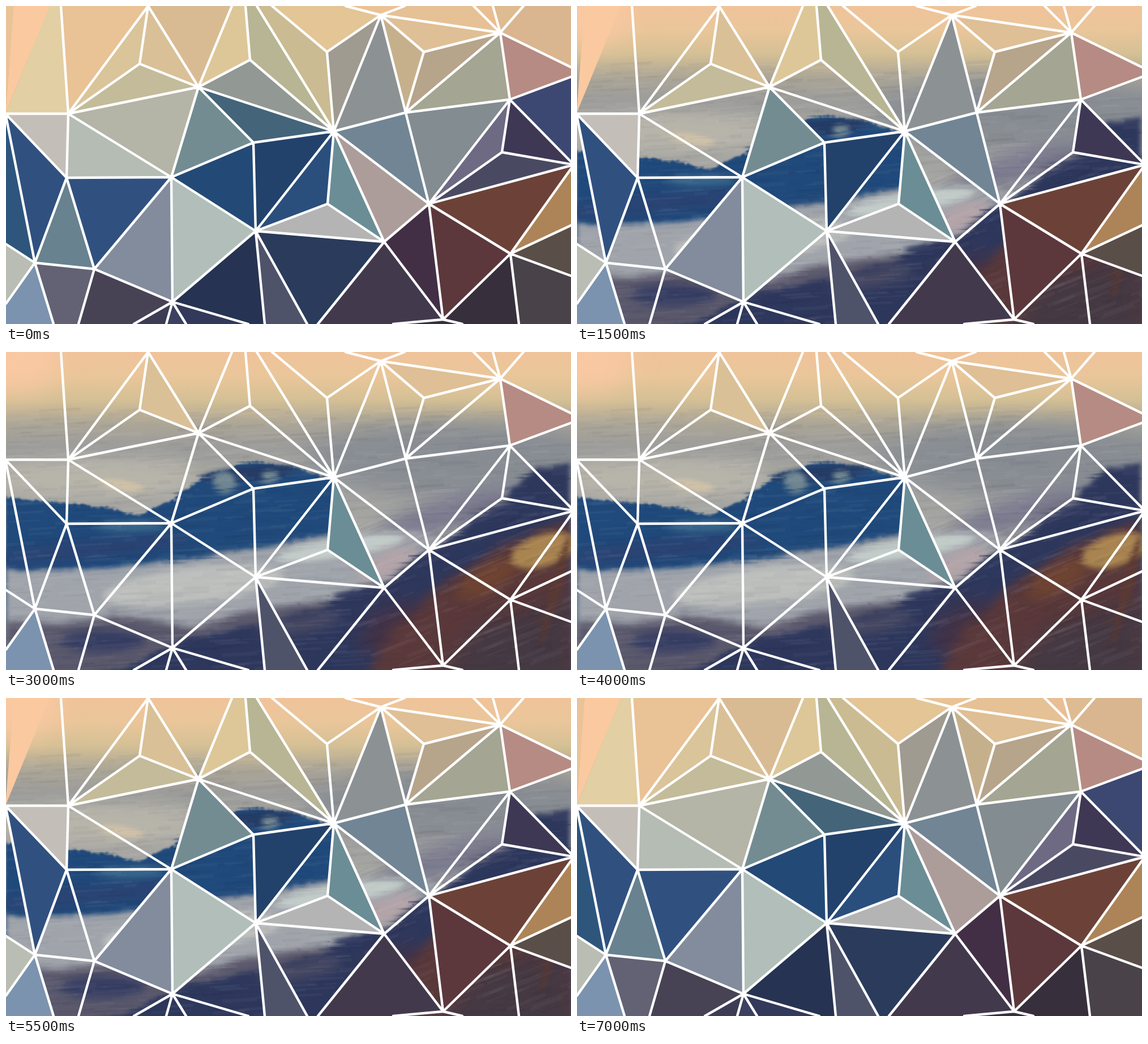
An HTML page with a canvas that plays this animation: 998x561 px, repeating every 7500 ms.

```html
<!DOCTYPE html>
<html lang="en">
<head>
<meta charset="utf-8">
<title>Triangles over a painted landscape</title>
<style>
html, body { margin: 0; width: 100%; height: 100%; overflow: hidden; background: #fff; }
canvas { display: block; }
</style>
</head>
<body>
<canvas id="stage" width="998" height="561"></canvas>
<script>
const W = 998, H = 561, STEP = 500, STEPS = 15;
const ctx = document.getElementById('stage').getContext('2d');

const parse = text => text.trim().split(/\s+/).map(p => p.split(',').map(Number));

// Mesh corners: a-z in the picture, the others on its four sides.
const points = {};
const place = (names, list) => [...names].forEach((n, i) => points[n] = list[i]);
place('abcdefghijklmnopqrstuvwxyz', parse(`
  -1,190 110,190 236,102 340,143 431,95 579,221 567,81 662,16 738,81 873,47 706,188
  890,165 876,258 1003,280 747,349 668,416 568,349 441,397 437,241 292,302 107,303
  51,453 156,464 294,522 891,437 772,553`));
place('8BCDAEFGHIJKLMN',
  [0, 14, 77, 97, 251, 399, 423, 443, 470, 600, 704, 826, 860, 914, W].map(x => [x, 0]));
place('94321' + '0ZYXWVUTS',
  [0, 84, 128, 226, 283, 318, 428, 457, 532, 551, 684, 806, 906, W].map(x => [x, H]));
place('765', [190, 420, 525].map(y => [0, y]));
place('OPQR', [108, 125, 387, 476].map(y => [W, y]));

// Facets by the step at which they disappear, as corners:colour.
const groups = [
  `8Ba7:eac398 bAc:dac49a GHgf:cabb92 jLM:debb91 hik:c6b08c lmo:6e6a83 rqf:2b4f7d
   bdt:b4b4a7 uvw:68828f 7av6:2e567d x21:3c3d54 x0Z:33395a zyTU:37303c trs:234a76`,
  `aCDb:e2cfa4 AdE:d9bb93 ghf:9f9b90 hIJ:e9c295 hJKj:e5c195 mno:494a62 sdf:44647a
   utw:305180 wx23:474354 x10:3c4162 rXWp:2b3b5c poz:422f45 yRST:494248 zVU:37303c`,
  `bDA:e9c296 HIhg:e3c596 jKL:eabe93 jMNO:d9b68f lPn:3d4872 klo:838c90 fop:ac9d9b
   def:929894 but:b5bcb4 vw34:636274 xrYZ:263352`,
  `eFGf:b8b594 ijk:b6a48b fko:718594 auv:305180 ozy:5c383d nyQ:ad8458 txw:838c9d`,
  `aBC:fac9a0 lmn:3e3854 qpr:b4b4b4 dst:738c92 pWVz:423a4c ony:6c4238`,
  `dEFe:ddc799 kjl:a4a592 hfk:8c9294 rsf:22426b bcd:c3bb99 abu:c3beb8 6v5:b9bdb3
   yQR:5a4e48 txr:b1beba`,
  `Acd:d9c097 hji:dfbf95 jOPl:b68b83 fpq:6b8d95 v495:7b93ae rYX:4f536a`
];

const onBorder = ([x, y]) => x <= 0 || y <= 0 || x >= W || y >= H;
const mesh = new Path2D();
const facets = groups.flatMap((group, i) => group.split(/\s+/).map(item => {
  const [names, color] = item.split(':');
  const corners = [...names].map(n => points[n]);
  const path = new Path2D();
  corners.forEach((p, k) => {
    const next = corners[(k + 1) % corners.length];
    path.lineTo(...p);
    if (onBorder(p) && onBorder(next)) return;
    mesh.moveTo(...p);
    mesh.lineTo(...next);
  });
  return { path, color: '#' + color, gone: i + 1 };
}));

let seed = 7;
const rand = (lo, hi) => {
  seed = (seed * 16807) % 2147483647;
  return lo + (hi - lo) * seed / 2147483647;
};

function layer() {
  const c = document.createElement('canvas');
  c.width = W;
  c.height = H;
  return c;
}

// Height at x of a soft curve through a few key points.
function curveY(keys, x) {
  const i = Math.max(1, keys.findIndex(k => k[0] >= x));
  const [x0, y0] = keys[i - 1], [x1, y1] = keys[i];
  const t = (x - x0) / (x1 - x0);
  const ease = (t + t * t * (3 - 2 * t)) / 2;
  return y0 + (y1 - y0) * ease;
}

function paintLandscape() {
  const canvas = layer(), g = canvas.getContext('2d');
  const sky = g.createLinearGradient(0, 0, 0, H);
  ['f0c39a', 'eac69a', 'd5c095', 'aca697', '9c9c9b', 'a4a49f', 'a5a5a2']
    .forEach((c, i) => sky.addColorStop(i * .075, '#' + c));
  g.fillStyle = sky;
  g.fillRect(0, 0, W, H);

  // A rough-edged layer that fills everything under its curve.
  const hill = (color, blur, text) => {
    const keys = parse(text);
    g.filter = `blur(${blur}px)`;
    g.fillStyle = color;
    g.beginPath();
    g.moveTo(0, H + 50);
    for (let x = 0; x <= W; x += 4) g.lineTo(x, curveY(keys, x) + rand(-3, 3));
    g.lineTo(W, H + 50);
    g.fill();
  };
  const blob = (color, blur, x, y, rx, ry, tilt = 0) => {
    g.filter = `blur(${blur}px)`;
    g.fillStyle = color;
    g.beginPath();
    g.ellipse(x, y, rx, ry, tilt, 0, 7);
    g.fill();
  };

  // sky and mist
  blob('#f8c8a2', 25, 10, 10, 90, 60);
  blob('#888d93', 20, 800, 190, 270, 65);
  blob('#b7b4aa', 14, 150, 222, 190, 36);
  blob('#d0c2a8', 4, 205, 235, 40, 9, .15);
  blob('#7c7d90', 14, 780, 285, 130, 30, -.3);
  // ridge, surf, shore, navy slope, brown slope
  hill('#204a7b', 1.5, '0,256 60,262 110,266 180,276 235,290 265,272 290,262 325,238 360,214 440,193 500,203 579,224 600,340 998,610');
  blob('#263d66', 4, 430, 215, 85, 13, -.1);
  blob('#708692', 4, 385, 230, 20, 20);
  blob('#73888f', 4, 466, 220, 15, 11);
  blob('#3a688c', 6, 220, 308, 60, 10);
  blob('#2b4474', 9, 150, 348, 180, 16, -.1);
  hill('#a0a4ab', 4, '0,385 160,382 290,370 440,346 560,325 640,316 735,317 790,350 998,610');
  blob('#bcbfbc', 6, 330, 412, 160, 32, -.12);
  blob('#c3ccc9', 5, 590, 346, 115, 16, -.15);
  blob('#b3a4a8', 8, 675, 374, 60, 20, -.4);
  hill('#5b596c', 6, '0,475 90,480 200,465 330,484 440,455 560,440 660,408 760,350 998,290');
  blob('#343c62', 8, 170, 510, 75, 18);
  hill('#2e385d', 4, '0,600 200,560 330,502 440,482 560,452 590,424 668,412 745,350 872,268 900,235 940,203 998,195');
  blob('#4c4c64', 10, 520, 480, 75, 14, -.2);
  blob('#6c6a7d', 8, 845, 274, 45, 6, -.35);
  blob('#443347', 18, 690, 490, 70, 45, -.4);
  hill('#5a393b', 9, '0,610 620,600 690,480 790,395 890,335 998,295');
  hill('#453943', 16, '0,620 740,610 840,480 998,430');
  blob('#6f4432', 10, 850, 400, 60, 22, -.5);
  blob('#a98450', 5, 950, 350, 60, 28, -.3);
  blob('#5b3a33', 4, 970, 420, 7, 100, .25);
  g.filter = 'none';

  // Smear small patches sideways for brushed edges.
  const clean = layer();
  clean.getContext('2d').drawImage(canvas, 0, 0);
  g.globalAlpha = .4;
  for (let i = 0; i < 1600; i++) {
    const w = rand(20, 75), h = rand(2, 6), x = rand(0, W - w), y = rand(90, H - h);
    g.drawImage(clean, x, y, w, h, x + rand(-16, 16), y + rand(-5, 5), w, h);
  }
  // Faint light and dark strokes, steeper on the right-hand slope.
  g.globalAlpha = .03;
  for (let i = 0; i < 1200; i++) {
    const x = rand(-20, W), y = rand(100, H), len = rand(15, 80);
    const tilt = x > 600 && y > 300 ? -.4 : -.06;
    g.strokeStyle = rand(0, 1) < .5 ? '#fff' : '#101428';
    g.lineWidth = rand(1, 7);
    g.beginPath();
    g.moveTo(x, y);
    g.lineTo(x + len, y + len * tilt);
    g.stroke();
  }
  return canvas;
}

const landscape = paintLandscape();
ctx.strokeStyle = '#fff';
ctx.lineWidth = 4.4;
ctx.lineCap = 'round';

let shown = -1;
function draw() {
  const step = Math.floor(performance.now() / STEP) % STEPS;
  const level = Math.min(step, STEPS - 1 - step);
  if (level !== shown) {
    shown = level;
    ctx.drawImage(landscape, 0, 0);
    for (const f of facets) {
      if (f.gone <= level) continue;
      ctx.fillStyle = f.color;
      ctx.fill(f.path);
    }
    ctx.stroke(mesh);
  }
  requestAnimationFrame(draw);
}
draw();
</script>
</body>
</html>
```
